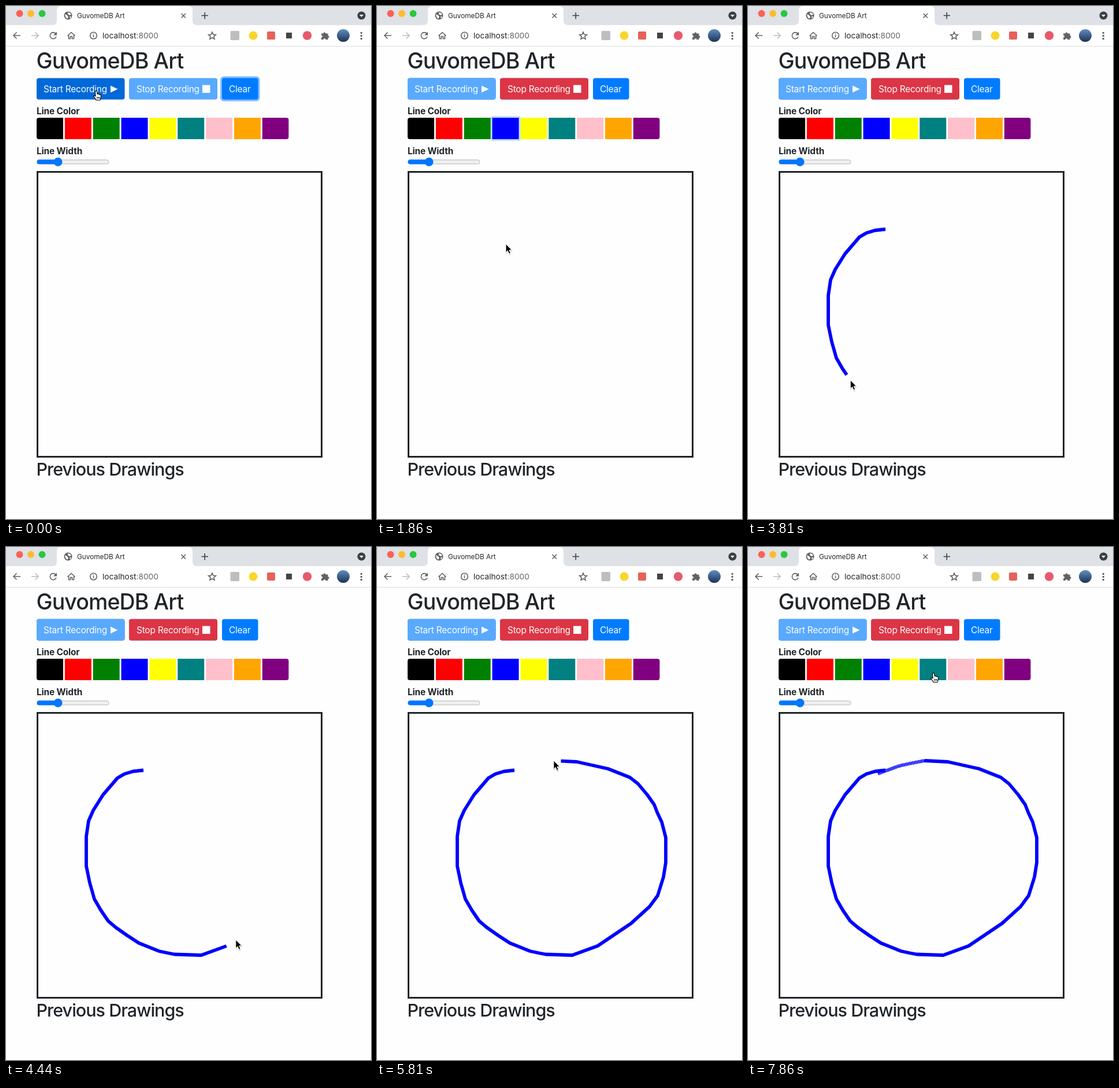
An HTML page that plays this animation: 632 by 886 pixels, repeating every 8000 ms.

```html
<!DOCTYPE html>
<html lang="en">
<head>
<meta charset="utf-8">
<title>GuvomeDB Art</title>
<style>
html, body { margin: 0; height: 100%; overflow: hidden; background: #fefefe; }
svg { display: block; width: 100vw; height: 100vh; }
text { font-family: Inter, "Liberation Sans", sans-serif; font-optical-sizing: none; fill: #212529; }
.heading { font-weight: 500; }
.label { font-weight: 700; font-size: 15.4px; letter-spacing: -.15px; }
.button { font-size: 15.4px; letter-spacing: -.2px; fill: #fff; }
.icon { fill: none; stroke: #5f6368; stroke-width: 1.6; }
.ink { fill: none; stroke: #00f; stroke-width: 5.8; stroke-linejoin: round; }
</style>
</head>
<body>
<svg viewBox="0 0 632 886">
  <defs>
    <linearGradient id="photo" x2="0" y2="1"><stop stop-color="#5f8fc4"/><stop offset="1" stop-color="#1d3152"/></linearGradient>
    <clipPath id="group"><rect x="53" y="193" width="436.5" height="37" rx="4"/></clipPath>
  </defs>

  <!-- Browser window -->
  <path fill="#dee1e6" d="M0 0H632V33H0z"/>
  <path fill="#fff" d="M0 33H80Q88 33 88 25V8Q88 0 96 0H315Q323 0 323 8V25Q323 33 331 33H632V69H0z"/>
  <path fill="#dadce0" d="M0 69H632V70H0z"/>
  <circle cx="23.5" cy="13" r="6" fill="#fe5f57"/>
  <circle cx="43" cy="13" r="6" fill="#febc2e"/>
  <circle cx="62.5" cy="13" r="6" fill="#28c840"/>
  <circle cx="107.5" cy="16.5" r="7" fill="#5f6368"/>
  <path fill="#fff" d="M102 14l4 2 2 3-2 3-3-3zM107 11l4 1 2 3-3 1-3-2zM110 18l3 0-2 4z"/>
  <text x="123" y="20.8" font-size="11.8">GuvomeDB Art</text>
  <path class="icon" stroke-width="1.5" d="M303.500 13l7.500 7.500m0-7.500l-7.500 7.500"/>
  <path class="icon" style="stroke:#3c4043" d="M338.500 16.500H350M344.200 11V22.500"/>
  <circle cx="615.500" cy="16.500" r="7" fill="#3c4043"/>
  <path fill="#fff" d="M612 15h7l-3.500 4z"/>

  <path class="icon" d="M25 51H13M18.500 45.500L13 51l5.500 5.500"/>
  <path class="icon" style="stroke:#babcbe" d="M44 51H56M50.500 45.500L56 51l-5.500 5.500"/>
  <path class="icon" d="M86 47.500A5.500 5.500 0 1 0 87 53"/>
  <path fill="#5f6368" d="M88 44.500v6h-6z"/>
  <path class="icon" d="M106.500 51.500L113 45.500l6.500 6M108.500 50.500V56.500H111.500V52.500H114.500V56.500H117.500V50.500"/>
  <circle class="icon" stroke-width="1.4" cx="151.500" cy="51" r="5.800"/>
  <path class="icon" d="M151.500 50v4M151.500 47.500v1.400"/>
  <text x="167" y="56" font-size="13.7">localhost<tspan fill="#5f6368">:8000</tspan></text>
  <path class="icon" stroke-width="1.3" d="M357 45l1.800 4.200 4.600.4-3.500 3 1.100 4.500-4-2.400-4 2.400 1.100-4.500-3.500-3 4.600-.4z"/>
  <rect x="388.500" y="43" width="15.500" height="16" rx="2" fill="#bebebe"/>
  <circle cx="428" cy="51" r="7.500" fill="#f8d62b"/>
  <rect x="452" y="44" width="14" height="14" rx="2" fill="#e8605a"/>
  <rect x="485" y="46" width="10" height="10" fill="#444"/>
  <circle cx="521.500" cy="51" r="7.700" fill="#e65a6c"/>
  <path fill="#5f6368" d="M546 47.500h3.500a2 2 0 1 1 4 0H557.500v3.700a2 2 0 1 1 0 4V58H553.500a2 2 0 0 0-4 0H546v-3.500a2 2 0 0 0 0-4z"/>
  <circle cx="584" cy="51" r="11" fill="url(#photo)"/>
  <path fill="#5f6368" d="M613.700 45h3v3h-3zm0 5h3v3h-3zm0 5h3v3h-3z"/>

  <!-- Page -->
  <text class="heading" x="52.500" y="108" font-size="37.5" letter-spacing="-.9">GuvomeDB Art</text>
  <rect x="53" y="124.500" width="152.500" height="37" rx="4" fill="#0069d9"/>
  <rect class="recording" x="53" y="124.500" width="152.500" height="37" rx="4" fill="#59a9ff"/>
  <rect x="213" y="124.500" width="153" height="37" rx="4" fill="#59a9ff"/>
  <rect class="recording" x="213" y="124.500" width="153" height="37" rx="4" fill="#dc3545"/>
  <rect id="clearRing" x="371" y="121.500" width="68.500" height="43" rx="6" fill="#80bdff"/>
  <rect x="374" y="124.500" width="62.500" height="37" rx="4" fill="#007bff"/>
  <text class="button" x="65" y="149">Start Recording</text>
  <path fill="#fff" d="M181 137.500L193.500 143.500 181 149.500z"/>
  <text class="button" x="226" y="149">Stop Recording</text>
  <path fill="#fff" d="M340 136.500h13.500v13.500h-13.500z"/>
  <text class="button" x="386" y="149">Clear</text>

  <text class="label" x="53" y="187">Line Color</text>
  <rect id="swatchRing" x="196.700" y="190" width="52" height="43" rx="3" fill="#bfdeff"/>
  <g id="swatches" clip-path="url(#group)"></g>
  <text class="label" x="53" y="255.500">Line Width</text>
  <rect x="54" y="265.800" width="124" height="7" rx="3.500" fill="#efefef" stroke="#b8b8b8"/>
  <rect x="53.500" y="265.300" width="40" height="8" rx="4" fill="#0075ff"/>
  <circle cx="90" cy="269.300" r="7.500" fill="#0075ff"/>
  <rect x="54.500" y="286.500" width="492" height="492" fill="none" stroke="#212529" stroke-width="3"/>
  <text class="heading" x="52.500" y="811" font-size="30.5" letter-spacing="-1">Previous Drawings</text>

  <path id="line" class="ink"/>
  <path id="tail" class="ink" stroke-dasharray="1.9 .6"/>

  <g id="cursor">
    <g id="arrow" stroke-linejoin="round">
      <path fill="#000" opacity=".18" d="M0 2V17l3.500-3 2.500 5.500 3-1.200-2.500-5.300H12z"/>
      <path fill="#000" stroke="#fff" d="M0 0V14.500l3.300-3 2.300 5.300 2.700-1.100-2.300-5.200H10.500z"/>
    </g>
    <g id="hand" stroke="#000" stroke-width="1.100" stroke-linejoin="round">
      <path fill="#fff" d="M-1.600 1.200Q-1.600-.4 0-.4 1.400-.4 1.600 1.200L2 5Q3.600 4 4.400 5.600 5.800 4.800 6.600 6.200 8.600 5.800 8.600 8L8.200 11.500Q7.600 13 7.200 15.500H0Q-.8 13-3 10.800L-4.600 8.600Q-4.600 7-2.400 8L-.8 9z"/>
      <path d="M1.800 10v3M3.900 10v3M6 10v3"/>
    </g>
  </g>
</svg>
<script>
const LOOP = 8000, INK_LAG = 45;
const $ = id => document.getElementById(id);
const clamp = v => Math.max(0, Math.min(1, v));
const ramp = (t, start, duration = 150) => clamp((t - start) / duration);
const smooth = k => k * k * (3 - 2 * k);

["black", "red", "green", "blue", "yellow", "teal", "pink", "orange", "purple"].forEach((color, i) => {
  $("swatches").innerHTML += `<rect x="${53 + 48.85 * i}" y="193" width="46" height="37" fill="${color}"/>`;
});

// Pointer legs: start time, end time, route, kind of movement
const legs = [
  [560, 980, "156,147 218,217", "move"],
  [1340, 1690, "218,217 223,411", "move"],
  [1860, 2270, "223,411 238,385.5", "move"],
  [2510, 2680, "238,385.5 220,387.5 205,392", "line"],
  [2680, 3300, "205,392 193,399 168,428 151,455 143,473 139,500 139,531", "line"],
  [3300, 3810, "139,531 139,551 145,580 153,608 164,627 177,646", "line"],
  [3810, 4150, "177,646 190,657 210,671 230,684 265,698 279,701", "line"],
  [4150, 5060, "279,701 292,703.5 338,705 382,689 440,650 472,621 486,602 496,570 500,545 500,502 493,475 485,458", "line"],
  [5060, 5810, "485,458 480,445 468,428 452,409 438,398 400,383 346,371 306,369", "line"],
  [5810, 6580, "306,369 280,374 262,378 240,386 225,391.5", "tail"],
  [6700, 7450, "225,391.5 327,232", "move"],
  [7450, 7860, "327,232 321,218", "move"]
].map(([start, end, route, kind]) => {
  const points = route.split(" ").map(p => p.split(",").map(Number));
  const sizes = points.slice(1).map((p, i) => Math.hypot(p[0] - points[i][0], p[1] - points[i][1]));
  return { start, end, points, sizes, kind, total: sizes.reduce((a, b) => a + b) };
});

// The part of a leg travelled by time t, as a list of points
function travelled(leg, t) {
  let k = ramp(t, leg.start, leg.end - leg.start);
  if (leg.kind === "move") k = smooth(k);
  let left = k * leg.total;
  const out = [leg.points[0]];
  for (let i = 0; i < leg.sizes.length && left > 0; i++) {
    const f = Math.min(1, left / leg.sizes[i]);
    const [x, y] = leg.points[i], [nx, ny] = leg.points[i + 1];
    out.push([x + (nx - x) * f, y + (ny - y) * f]);
    left -= leg.sizes[i];
  }
  return out;
}

function ink(kind, t) {
  const points = legs.filter(leg => leg.kind === kind && t > leg.start).flatMap(leg => travelled(leg, t));
  $(kind).setAttribute("d", points.length ? "M" + points.join("L") : "");
}

function draw(t) {
  const recording = ramp(t, 410);
  document.querySelectorAll(".recording").forEach(el => el.setAttribute("opacity", recording));
  $("clearRing").setAttribute("opacity", 1 - recording);
  $("swatchRing").setAttribute("opacity", ramp(t, 1340) - ramp(t, 2510));

  ink("line", t - INK_LAG);
  ink("tail", t - INK_LAG);

  const leg = legs.filter(leg => t >= leg.start).pop() || legs[0];
  const [x, y] = travelled(leg, t).pop();
  const pointing = t < 410 || (y > 193 && y < 230);
  $("cursor").setAttribute("transform", `translate(${x} ${y})`);
  $("hand").setAttribute("visibility", pointing ? "visible" : "hidden");
  $("arrow").setAttribute("visibility", pointing ? "hidden" : "visible");
}

const began = performance.now();
(function tick() {
  draw((performance.now() - began) % LOOP);
  requestAnimationFrame(tick);
})();
</script>
</body>
</html>
```
